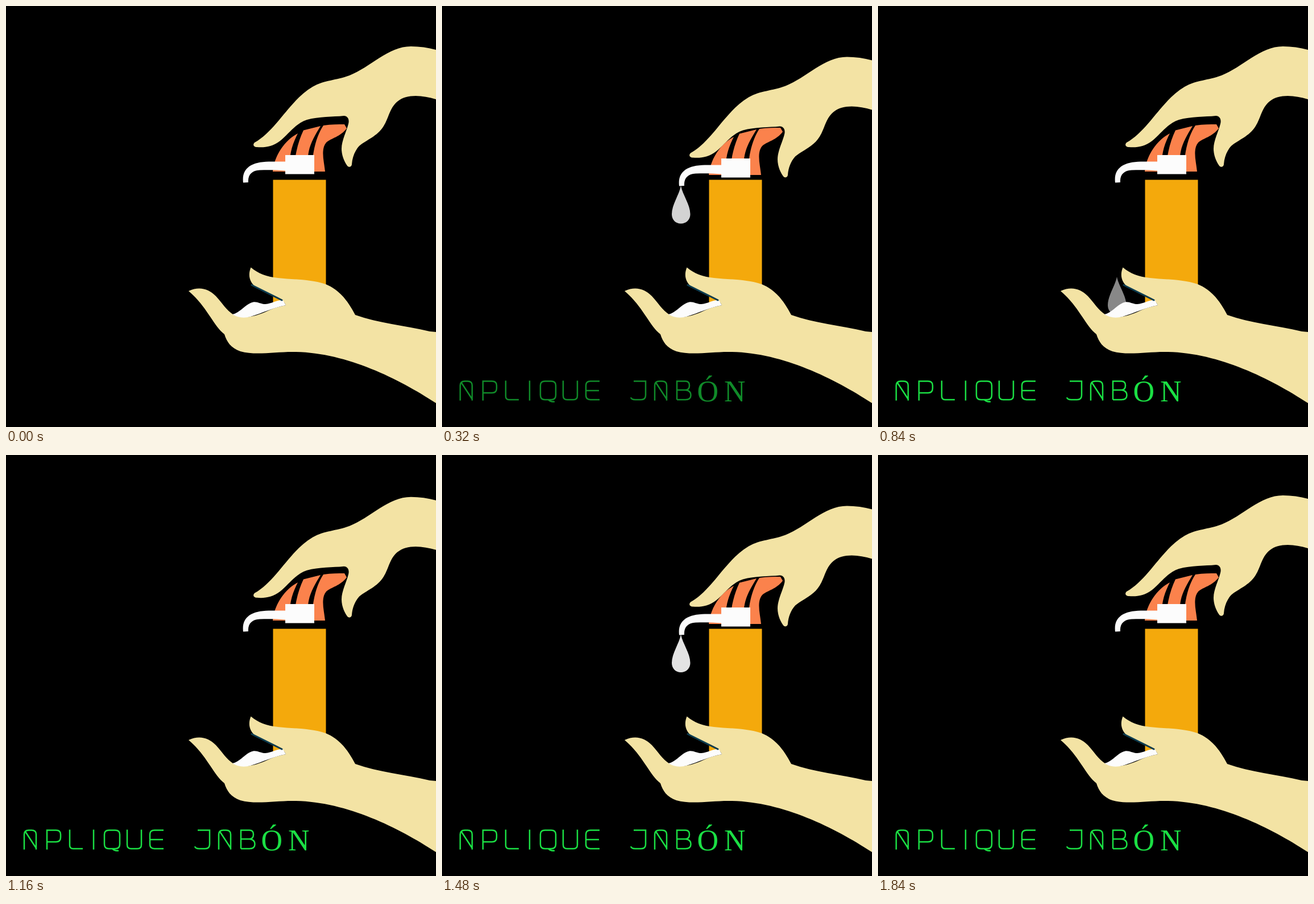
Recreate the animation shown at these times as an HTML page. Size 756 px wide and 740 px high, loop 2 s.

```html
<!DOCTYPE html>
<html lang="es">
<head>
<meta charset="utf-8">
<title>Aplique jabón</title>
<style>
  html, body { margin: 0; width: 100%; height: 100%; overflow: hidden; background: #000; }
  svg { display: block; width: 756px; height: 740px; }
  .skin { fill: #f3e3a4; }
  .foam { fill: #fcfcfc; }
  .lines { fill: none; stroke: #1be044; stroke-width: 2.5; }
  text { font: 52px "Liberation Serif", "Times New Roman", serif; fill: #1be044; }
</style>
</head>
<body>
<svg viewBox="0 0 756 740" xmlns="http://www.w3.org/2000/svg">
  <rect width="756" height="740" fill="#000"/>
  <rect x="469.5" y="305.5" width="93" height="215.5" fill="#f4a90c"/>

  <g id="pump">
    <g fill="#fb824c">
      <path d="M469 291C472 262 490 236 513 224C507 236 502 248 500 262V291Z"/>
      <path d="M523 218.500L553 211C543 228 533 243 531 264H509C512 246 517 231 523 218.500Z"/>
      <path d="M558 210C572 208 584 208 595 208L599 215C588 230 572 232 563 240C553 252 559 272 561 291H540V262C543 240 550 222 558 210Z"/>
    </g>
    <path class="foam" d="M491 262H542V295.500H491V289.500C475 288 460 288 446 288.500C432 289 425 297 426 310L417 310.500C414 286 430 274 462 273.500H491Z"/>
  </g>

  <path id="presser" class="skin" d="M756 77C742 73 727 71 712 71C672 71 640 108 604 122C580 131 560 130 539 142C498 166 476 218 437 240C433 244 436 248 441 248C454 249 468 248 482 237C497 225 508 207 529 200C550 194 575 195 594 193C601 193 604 200 602 207C599 220 590 236 590 251C590 264 596 276 601 282C604 284 608 282 608 278C609 266 613 255 621 246C634 235 653 229 664 211C673 197 674 180 688 168C705 154 732 157 756 164Z"/>

  <path id="drop" class="foam" d="M420 0C417 16 404 33 404 50C404 60 411 66.500 420 66.500S436.500 60 436.500 50C436.500 33 423 16 420 0Z"/>

  <path class="skin" d="M430.500 459.500C443 470 458 476 478 478C505 481 535 480 562 489C587 499 602 520 614 543C655 558 700 561 745 572L756 573V698C690 655 600 610 510 608C475 607 440 615 412 607C395 601 388 590 384 577C364 561 353 528 321 501C340 492 356 497 369 510C380 522 388 535 399 542C418 552 440 545 460 536C472 530 483 528 492 526L487 517C470 507 450 501 439 494C428 485 425 473 430.500 459.500Z"/>
  <path class="foam" d="M398 542C410 540 420 526 430 522C440 517 446 524 456 524C468 523 476 516 487 517L492 526C470 530 450 540 430 546C418 549 408 548 398 542Z"/>
  <path d="M432 490.500L485 517" stroke="#0c3c50" stroke-width="3" stroke-linecap="round"/>

  <g id="caption" role="img" aria-label="APLIQUE JABÓN">
    <defs>
      <path id="letterA" d="M32 693.500V667Q32 659.500 40 659.500H45Q53 659.500 53 667V693.500M34 662L53 691"/>
    </defs>
    <g class="lines">
      <use href="#letterA"/>
      <path d="M72 693.500V659.500H88Q96 659.500 96 667V672Q96 680 88 680H72"/>
      <path d="M112 658.500V686Q112 692 118 692H135"/>
      <path d="M154 658.500V693.500"/>
      <path d="M181 659.500H192Q200 659.500 200 667V684Q200 692 192 692H181Q173 692 173 684V667Q173 659.500 181 659.500M187 692Q191 696 198 695.500"/>
      <path d="M213 658.500V685Q213 692 220 692H231Q238 692 238 685V658.500"/>
      <path d="M277 659.500H261Q253 659.500 253 667V684Q253 692 261 692H277M253 676H276"/>
      <path d="M337 659.500H358V684Q358 692 350 692H340Q333 692 332 688"/>
      <use href="#letterA" x="342"/>
      <path d="M413 692V659.500H428Q435 659.500 435 667T428 675H413M428 675Q437.500 676 437.500 684T428 692H413"/>
    </g>
    <text x="448.500" y="694.500">Ó</text>
    <text x="496" y="694.500">N</text>
  </g>
</svg>
<script>
  const LOOP = 2000, STEP = 40, PRESS = 560, SECOND_PRESS = 1120;
  const [pump, presser, drop, caption] =
    ["pump", "presser", "drop", "caption"].map(id => document.getElementById(id));

  // Linear interpolation through [time, value] keys, held at both ends.
  function track(keys, t) {
    const i = keys.findIndex(key => key[0] > t);
    if (i === 0) return keys[0][1];
    if (i < 0) return keys[keys.length - 1][1];
    const [t0, v0] = keys[i - 1], [t1, v1] = keys[i];
    return v0 + (v1 - v0) * (t - t0) / (t1 - t0);
  }

  const handKeys = [[0, 0], [240, 17], [280, 18.5], [390, 18.5], [480, 8], [PRESS, 0]];
  const pumpKeys = [[240, 0], [320, 6], [400, 6], [PRESS, 0]];
  const drops = [
    { until: 1120,
      y: [[240, 310], [320, 316], [560, 338], [840, 476], [1120, 614]],
      alpha: [[240, 0], [320, 0.84], [560, 0.88], [840, 0.54], [1120, 0.2]] },
    { until: LOOP,
      y: [[1400, 312], [1490, 316], [1600, 399], [1680, 460], [1840, 550]],
      alpha: [[1380, 0], [1480, 0.9], [1600, 1], [1680, 1], [1840, 0]] }
  ];

  const shift = (el, y) => el.setAttribute("transform", `translate(0 ${y})`);

  function draw(t) {
    const phase = t < SECOND_PRESS ? t : t - SECOND_PRESS;
    shift(presser, track(handKeys, phase));
    shift(pump, track(pumpKeys, phase));
    const current = drops.find(d => t < d.until);
    shift(drop, track(current.y, t));
    drop.setAttribute("opacity", track(current.alpha, t));
    caption.setAttribute("opacity", Math.min(1, t / 520));
  }

  const start = performance.now();
  function tick(now) {
    const t = Math.max(0, now - start) % LOOP;
    draw(Math.floor(t / STEP) * STEP);
    requestAnimationFrame(tick);
  }
  draw(0);
  requestAnimationFrame(tick);
</script>
</body>
</html>
```
